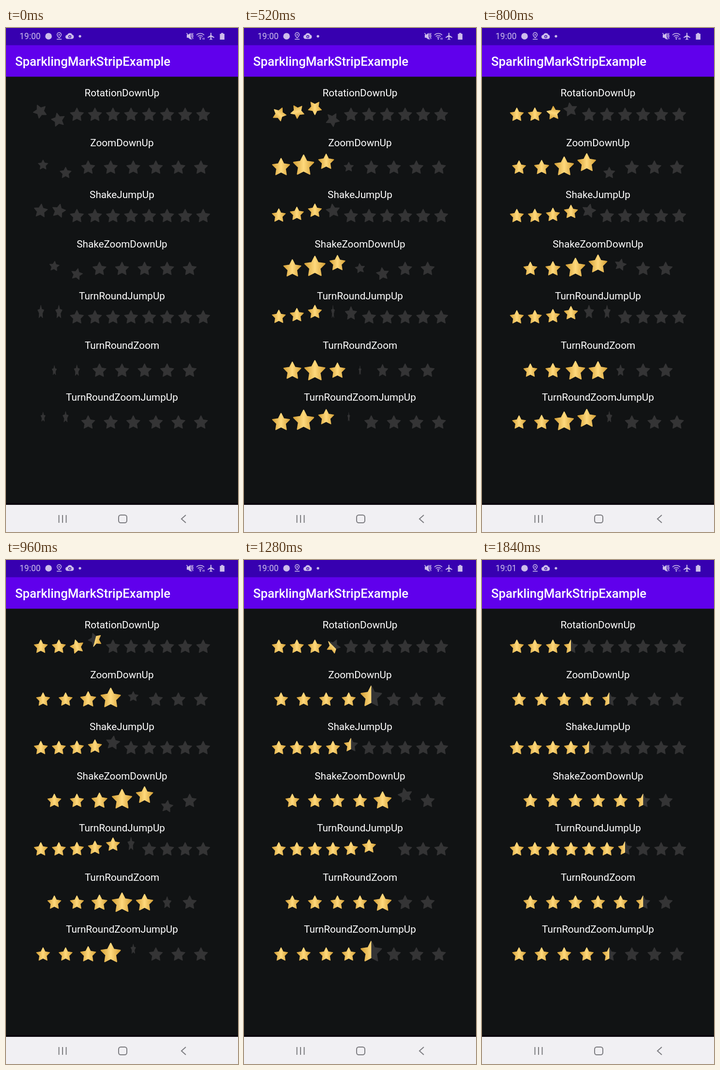
Animation, 480 px wide and 1040 px high, one loop 1880 ms. Source, as an HTML page:

```html
<!DOCTYPE html>
<html lang="en">
<head>
<meta charset="utf-8">
<title>Star rows</title>
<style>
  html, body { margin: 0; width: 100%; height: 100%; overflow: hidden; background: #111314; }
  svg { display: block; width: 100%; height: 100%; }
  text { font-family: Roboto, "Noto Sans", sans-serif; }
  .label { font-size: 20.7px; fill: #fff; text-anchor: middle; }
  .title { font-size: 25.8px; font-weight: 500; fill: #fff; }
  .clock { font-size: 17.5px; fill: #cdbdeb; }
  .grey { fill: #343435; stroke: #343435; }
  .gold { fill: url(#shine); stroke: url(#shine); }
  .grey, .gold { stroke-width: 1.6; stroke-linejoin: round; }
  .line { fill: none; stroke: #cdbdeb; stroke-width: 1.5; }
  .solid { fill: #cdbdeb; }
  .nav { fill: none; stroke: #7c7c80; stroke-width: 2; }
</style>
</head>
<body>
<svg viewBox="0 0 480 1040" id="stage">
  <defs>
    <linearGradient id="shine" gradientUnits="userSpaceOnUse" x1="-14" y1="0" x2="14" y2="0">
      <stop offset="0" stop-color="#d39f36"/>
      <stop offset=".5" stop-color="#ffd97c"/>
      <stop offset="1" stop-color="#d39f36"/>
    </linearGradient>
    <clipPath id="half"><rect x="-20" y="-20" width="20" height="40"/></clipPath>
  </defs>
  <rect width="480" height="1040" fill="#111314"/>
  <rect width="480" height="100.500" fill="#6000ec"/>
  <rect width="480" height="35.500" fill="#3700b0"/>
  <rect y="980" width="480" height="4" fill="#0c080e"/>
  <rect y="984" width="480" height="56" fill="#f1f0f3"/>

  <text class="clock" id="clock" x="28" y="23">19:00</text>
  <circle class="solid" cx="88" cy="17" r="6.8"/>
  <path class="line" d="M110 20.500c-3-3.200-4.300-4.600-4.300-6.700a4.300 4.300 0 0 1 8.600 0c0 2.100-1.300 3.500-4.300 6.700zM105 23.300h10"/>
  <circle class="solid" cx="110" cy="14" r="1.500"/>
  <path class="solid" d="M127.500 22.500a4.300 4.300 0 0 1-.5-8.600 5.400 5.400 0 0 1 10-.2 4.500 4.500 0 0 1-.5 8.800z"/>
  <circle cx="132" cy="17.800" r="2.300" fill="none" stroke="#3700b0" stroke-width="1.400"/>
  <circle class="solid" cx="153" cy="17" r="2.600"/>

  <path class="solid" d="M374 14h3l5-4v14l-5-4h-3z"/>
  <path class="line" d="M373.500 10.500l11 13M384.500 10.500l-1 3 1 3-1 3M387 10.500l-1 3 1 3-1 3 1 3"/>
  <path class="line" d="M394 14.500a11.500 11.500 0 0 1 16 0M396.800 17.500a7.500 7.500 0 0 1 10.400 0M399.500 20a3.800 3.800 0 0 1 5 0"/>
  <circle class="solid" cx="402" cy="22.500" r="1.400"/>
  <path class="line" id="arrows" style="stroke-width:1.200" d="M407.500 24v-4M410 20v4"/>
  <path class="solid" d="M423 10.500q1-1.500 2 0v4.500l6 4v1.500l-6-2v3.500l2 1.500v1l-3-.8-3 .8v-1l2-1.500v-3.500l-6 2v-1.500l6-4z"/>
  <path class="solid" d="M442.500 12h2.500v-1.800h4.500v1.800h2.500v12h-9.500z"/>

  <text class="title" x="19" y="78">SparklingMarkStripExample</text>

  <path class="nav" d="M109.500 1005v16M117 1005v16M124.500 1005v16"/>
  <rect class="nav" x="233" y="1005" width="17" height="16" rx="4.500"/>
  <path class="nav" d="M372 1005l-9 8 9 8"/>
</svg>
<script>
const LOOP = 1880, STEP = 40, SWITCH = 460, SETTLE = 480;
const stage = document.getElementById('stage');
const clock = document.getElementById('clock');
const arrows = document.getElementById('arrows');

// Curves as [ms, value] pairs, joined by straight lines.
const ZOOM = [[0, 1], [300, .7], [650, 1.57], [840, 1.29], [1000, 1]];
const SPIN = [[0, 0], [960, 360]];
const DIP = [[0, 0], [50, 8], [100, 11.5], [160, 11], [240, 6.5], [280, -1], [320, -6],
  [400, -11], [450, -12], [520, -12], [600, -8.5], [720, -3.5], [840, -1], [1000, 0]];
const JUMP = [[0, 0], [40, -5.5], [80, -8], [125, -11], [480, -11], [600, -7.5],
  [720, -3.2], [840, -1], [1000, 0]];

const ROWS = [
  { name: 'RotationDownUp', y: 178, count: 10, rating: 3.5, move: DIP, spin: true },
  { name: 'ZoomDownUp', y: 287, count: 8, rating: 4.5, move: DIP, zoom: true },
  { name: 'ShakeJumpUp', y: 387, count: 10, rating: 4.5, move: JUMP, shake: true },
  { name: 'ShakeZoomDownUp', y: 496, count: 7, rating: 5.5, move: DIP, zoom: true, shake: true },
  { name: 'TurnRoundJumpUp', y: 596, count: 10, rating: 6.5, move: JUMP, turn: true },
  { name: 'TurnRoundZoom', y: 706, count: 7, rating: 5.5, zoom: true, turn: true },
  { name: 'TurnRoundZoomJumpUp', y: 813, count: 8, rating: 4.5, move: JUMP, zoom: true, turn: true }
];

function add(tag, attrs, parent = stage) {
  const el = document.createElementNS('http://www.w3.org/2000/svg', tag);
  for (const key in attrs) el.setAttribute(key, attrs[key]);
  parent.appendChild(el);
  return el;
}

function curve(points, u) {
  if (u <= 0) return points[0][1];
  for (let i = 1; i < points.length; i++) {
    const [a, from] = points[i - 1], [b, to] = points[i];
    if (u <= b) return from + (to - from) * (u - a) / (b - a);
  }
  return points[points.length - 1][1];
}

const starPath = 'M' + Array.from({ length: 10 }, (_, i) => {
  const r = i % 2 ? 7.2 : 14.2, a = i * Math.PI / 5;
  return `${(r * Math.sin(a)).toFixed(2)} ${(1.4 - r * Math.cos(a)).toFixed(2)}`;
}).join('L') + 'Z';

// The half-filled star waits one extra beat.
function startOf(i, rating) {
  if (i === 0) return -315;
  return 200 * (i + (i + 1 > rating ? 1 : 0)) - 360;
}

const stars = [];
ROWS.forEach((row, n) => {
  const baseline = 141.2 + Math.floor(n / 2) * 209.33 + (n % 2) * 102.3;
  add('text', { class: 'label', x: 240, y: baseline }).textContent = row.name;
  const gap = row.count === 10 ? 37.33 : 46.67;
  for (let i = 0; i < row.count; i++) {
    const x = 240 + (i - (row.count - 1) / 2) * gap;
    const g = add('g', { transform: `translate(${x} ${row.y})` });
    const grey = add('path', { class: 'grey', d: starPath }, g);
    if (i >= row.rating) continue;
    const half = i + 1 > row.rating;
    const gold = add('path', { class: 'gold', d: starPath }, g);
    if (half) gold.setAttribute('clip-path', 'url(#half)');
    stars.push({ row, x, g, grey, gold, half, start: startOf(i, row.rating) });
  }
});

function pose({ row, x, g, grey, gold, half, start }, t) {
  const u = Math.min(1000, Math.max(0, t - start));
  const early = u < SETTLE;
  const dy = row.move ? curve(row.move, u) : 0;
  const size = row.zoom ? curve(ZOOM, u) : 1;
  const flip = row.turn && early ? Math.abs(Math.cos(Math.PI * u / SETTLE)) : 1;
  let angle = 0;
  if (row.spin) angle = curve(SPIN, u);
  if (row.shake && early) angle = -13 * Math.sin(u * Math.PI / 100);
  g.setAttribute('transform',
    `translate(${x} ${row.y + dy}) rotate(${angle}) scale(${size * flip} ${size})`);
  const lit = u >= SWITCH;
  gold.style.display = lit ? '' : 'none';
  grey.style.display = lit && !half ? 'none' : '';
}

function draw(now) {
  const t = Math.floor((now % LOOP) / STEP) * STEP;
  for (const star of stars) pose(star, t);
  clock.textContent = t < 1480 ? '19:00' : '19:01';
  arrows.style.opacity = t < 1240 ? 1 : .4;
}

let begin;
function tick(now) {
  if (begin === undefined) begin = now;
  draw(Math.max(0, now - begin));
  requestAnimationFrame(tick);
}
draw(0);
requestAnimationFrame(tick);
</script>
</body>
</html>
```
